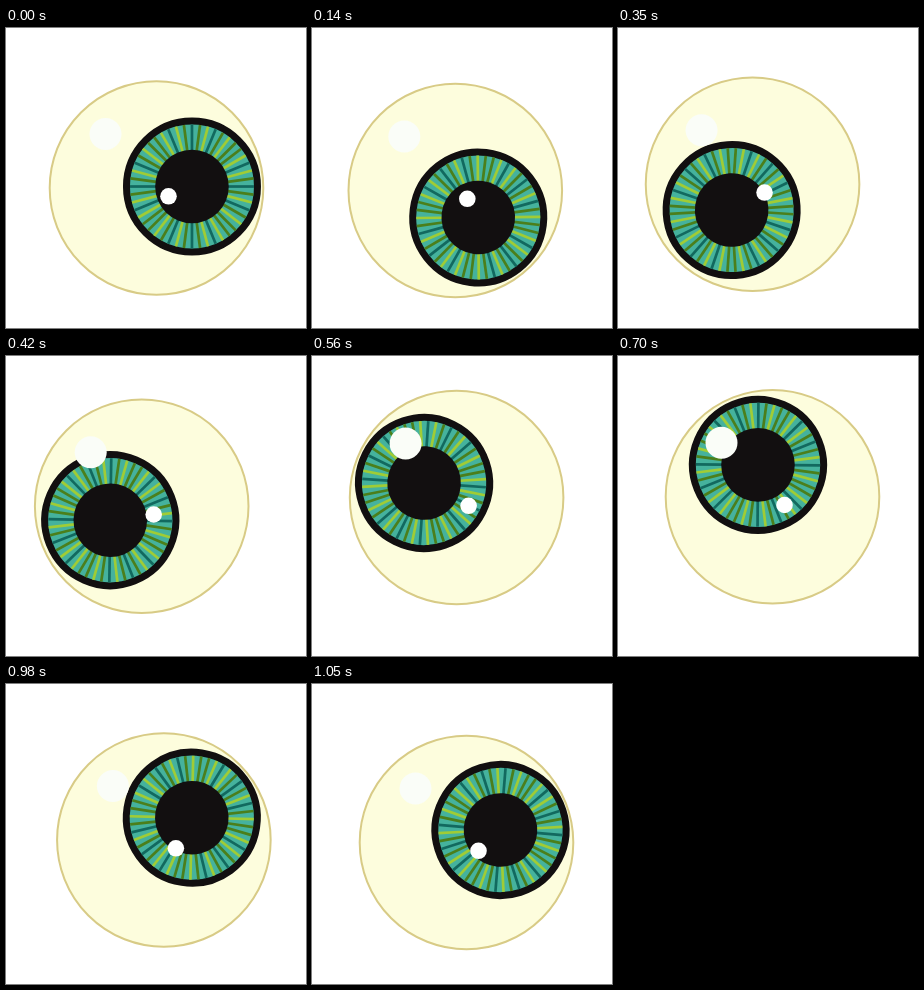
These frames come from a looping animation (300 by 300 pixels, 1.12 s). An HTML page:

```html
<!DOCTYPE html>
<html lang="en">
<head>
<meta charset="utf-8">
<title>Rolling eye</title>
<style>
  html, body { margin: 0; width: 100%; height: 100%; overflow: hidden; background: #fff; }
  svg { display: block; width: 100vw; height: 100vh; }
</style>
</head>
<body>
<svg viewBox="0 0 300 300">
  <g id="eye">
    <circle r="106.8" fill="#fdfddd" stroke="#d8cb86" stroke-width="2"/>
    <g id="iris">
      <circle r="65.5" fill="#45b29d" stroke="#120f10" stroke-width="7"/>
      <g id="rays" stroke-width="2.7"></g>
      <circle r="36.8" fill="#120f10"/>
    </g>
    <circle cx="-51" cy="-54" r="16" fill="#fafdf8"/>
    <circle cx="12" cy="8.3" r="8.3" fill="#fff"/>
  </g>
</svg>
<script>
const STEP = 70, STEPS = 16;
const eye = document.getElementById('eye');
const iris = document.getElementById('iris');
const rays = document.getElementById('rays');

// One quarter of the iris, repeated four times: teal, green, yellow.
const QUARTER = 'TGYTGYGGYTYG';
const COLORS = { T: '#12695f', G: '#4b7f1b', Y: '#a0cc35' };
for (let i = 0; i < 48; i++) {
  const ray = document.createElementNS('http://www.w3.org/2000/svg', 'line');
  ray.setAttribute('x1', 36);
  ray.setAttribute('x2', 62);
  ray.setAttribute('stroke', COLORS[QUARTER[i % 12]]);
  ray.setAttribute('transform', `rotate(${i * 7.5})`);
  rays.append(ray);
}

// step, eye x, eye y, iris angle, iris distance from the eye's centre
const KNOTS = [
  [0, 150.5, 160, -2.4, 35.5],
  [2, 143.3, 162.5, 49.6, 35.4],
  [4, 135.5, 161.3, 101.5, 32.6],
  [6, 135.7, 150.2, 156, 34.4],
  [8, 144.6, 141.5, 204, 35.6],
  [10, 154.5, 140.7, 245.5, 35],
  [12, 162.4, 150, 284.2, 34.6],
  [15, 154.5, 158.5, 339.8, 36.2]
];
const TURN = [STEPS, 0, 0, 360, 0];

function knot(i) {
  const n = KNOTS.length, lap = Math.floor(i / n);
  return KNOTS[i - lap * n].map((v, j) => v + lap * TURN[j]);
}

// Smooth closed curve through the knots.
function pose(step) {
  let i = KNOTS.length - 1;
  while (KNOTS[i][0] > step) i--;
  const [a, b, c, d] = [i - 1, i, i + 1, i + 2].map(knot);
  const span = c[0] - b[0], u = (step - b[0]) / span;
  return b.map((v, j) => {
    const m0 = (c[j] - a[j]) / (c[0] - a[0]) * span;
    const m1 = (d[j] - b[j]) / (d[0] - b[0]) * span;
    return v + m0 * u
      + (3 * (c[j] - v) - 2 * m0 - m1) * u * u
      + (2 * (v - c[j]) + m0 + m1) * u * u * u;
  });
}

function draw(ms) {
  const [, x, y, angle, distance] = pose(Math.floor(ms / STEP) % STEPS);
  eye.setAttribute('transform', `translate(${x} ${y})`);
  iris.setAttribute('transform', `rotate(${angle}) translate(${distance}) rotate(2.4)`);
}

const start = performance.now();
function tick() {
  draw(performance.now() - start);
  requestAnimationFrame(tick);
}
tick();
</script>
</body>
</html>
```
